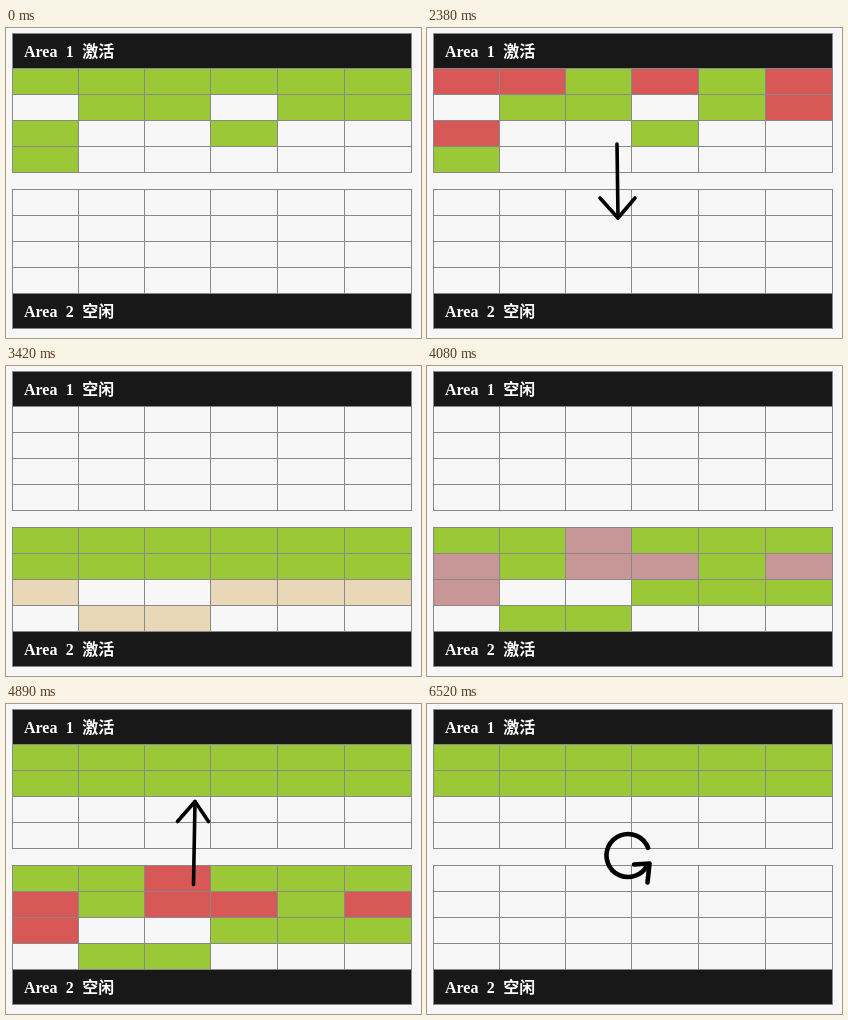
Write an HTML page with a canvas that moves like this. It is 415 px wide and 310 px high and loops after 8.02 s.

```html
<!DOCTYPE html>
<html lang="zh-CN">
<head>
<meta charset="utf-8">
<style>
html, body { margin: 0; width: 100%; height: 100%; overflow: hidden; background: #f7f7f7; }
canvas, svg { position: absolute; left: 0; top: 0; width: 415px; height: 310px; }
text { font: bold 16px "Liberation Serif", "Noto Sans CJK SC", "Noto Sans CJK", serif; fill: #fff; word-spacing: 4.4px; }
</style>
</head>
<body>
<canvas id="stage" width="415" height="310"></canvas>
<svg viewBox="0 0 415 310">
  <text id="label1" x="18" y="29">Area 1 激活</text>
  <text id="label2" x="18" y="289">Area 2 空闲</text>
</svg>
<script>
const ctx = document.getElementById('stage').getContext('2d');
const labels = [1, 2].map(n => document.getElementById('label' + n));

const LOOP = 8020;
const COLS = [6, 72, 138, 204, 271, 338, 405];
const ROW = 26;
const TOPS = [40, 161];
const LINE = '#888';

const GREEN = '#9ac836', RED = '#d85858', TAN = '#e8d8b8';
const live = { g: GREEN, x: GREEN, t: TAN };
const marked = { g: GREEN, x: '#c89696' };
const dead = { g: GREEN, x: RED };
const fading = { g: TAN, x: '#d8b8b8' };

// Rows of cells: g survives, x is collected, t is appearing
const EMPTY = '';
const FIRST = 'xxgxgx .gg.gx x..g.. g.....';
const MOVED = 'gggggg g.....';
const PARTIAL = 'gggggg gggggg';
const APPEARING = PARTIAL + ' t..ttt .tt...';
const SECOND = 'ggxggg xgxxgx x..ggg .gg...';

// [start, active area, cells 1, tint 1, cells 2, tint 2, icon, icon opacity]
const steps = [
  [0, 1, FIRST, live, EMPTY, live],
  [2000, 1, FIRST, marked, EMPTY, live],
  [2220, 1, FIRST, marked, EMPTY, live, arrowDown],
  [2380, 1, FIRST, dead, EMPTY, live, arrowDown],
  [2880, 2, FIRST, fading, MOVED, live, arrowDown],
  [3040, 2, EMPTY, live, MOVED, live],
  [3200, 2, EMPTY, live, PARTIAL, live],
  [3420, 2, EMPTY, live, APPEARING, live],
  [3580, 2, EMPTY, live, SECOND, live],
  [4080, 2, EMPTY, live, SECOND, marked],
  [4400, 2, EMPTY, live, SECOND, dead, arrowUp],
  [4890, 1, PARTIAL, live, SECOND, dead, arrowUp],
  [6040, 1, PARTIAL, live, SECOND, fading, arrowUp],
  [6200, 1, PARTIAL, live, EMPTY, live],
  [6360, 1, PARTIAL, live, EMPTY, live, refresh, 0.5],
  [6520, 1, PARTIAL, live, EMPTY, live, refresh]
];

function rect(x, y, w, h, color) {
  ctx.fillStyle = color;
  ctx.fillRect(x, y, w, h);
}

function polyline(...points) {
  ctx.beginPath();
  points.forEach(([x, y]) => ctx.lineTo(x, y));
  ctx.stroke();
}

function arrowUp() {
  ctx.lineWidth = 3.6;
  polyline([187.5, 180.5], [189, 97.5]);
  polyline([171.5, 117.5], [189, 97.5], [202.5, 117.5]);
}

function arrowDown() {
  ctx.lineWidth = 3.6;
  polyline([190, 116], [191, 190]);
  polyline([173, 170], [191, 190], [208, 170]);
}

function refresh() {
  ctx.lineWidth = 4.6;
  ctx.beginPath();
  ctx.arc(201, 151.5, 21.5, -0.36, 0.5, true);
  ctx.stroke();
  polyline([207, 160.5], [222.5, 159.5], [220.5, 178.5]);
}

function drawGrid(top, cells, tint) {
  const rows = cells.split(' ');
  const colorAt = (r, c) => tint[(rows[r] || '')[c]];

  for (let r = 0; r < 4; r++) {
    for (let c = 0; c < 6; c++) {
      const color = colorAt(r, c);
      if (color) rect(COLS[c], top + r * ROW, COLS[c + 1] - COLS[c], ROW, color);
    }
  }
  COLS.forEach(x => rect(x, top, 1, 4 * ROW + 1, LINE));
  for (let r = 0; r <= 4; r++) rect(6, top + r * ROW, 400, 1, LINE);
}

function draw(step) {
  const [, active, cells1, tint1, cells2, tint2, icon, alpha = 1] = step;
  rect(0, 0, 415, 310, '#f7f7f7');
  for (const y of [5, 265]) {
    rect(6, y, 400, 36, LINE);
    rect(7, y + 1, 398, 34, '#181818');
  }
  drawGrid(TOPS[0], cells1, tint1);
  drawGrid(TOPS[1], cells2, tint2);
  labels.forEach((el, i) => {
    el.textContent = `Area ${i + 1} ${active === i + 1 ? '激活' : '空闲'}`;
  });
  if (icon) {
    ctx.globalAlpha = alpha;
    ctx.strokeStyle = '#000';
    ctx.lineCap = ctx.lineJoin = 'round';
    icon();
    ctx.globalAlpha = 1;
  }
}

let shown, start;
function tick(now) {
  start ??= now;
  const t = (now - start) % LOOP;
  const step = steps.findLast(s => s[0] <= t) || steps[0];
  if (step !== shown) draw(shown = step);
  requestAnimationFrame(tick);
}
draw(shown = steps[0]);
requestAnimationFrame(tick);
</script>
</body>
</html>
```
